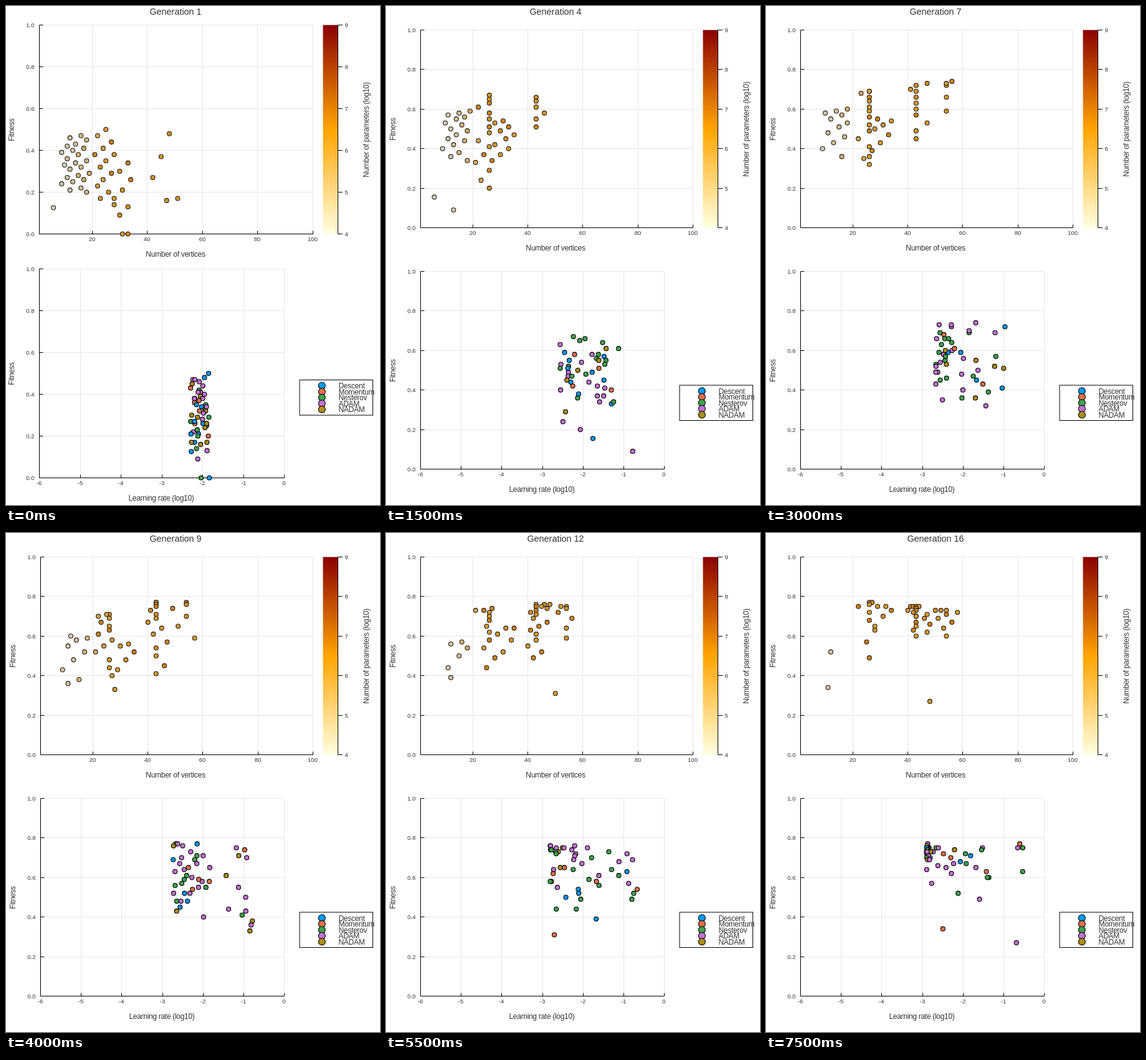
An HTML page that plays this animation: 600 by 800 pixels, repeating every 8 s.

```html
<!DOCTYPE html>
<html lang="en">
<head>
<meta charset="utf-8">
<title>Generations</title>
<style>
  html, body { margin: 0; width: 100%; height: 100%; overflow: hidden; background: #fff; }
  svg { display: block; width: 600px; height: 800px; font-family: "Liberation Sans", Arial, sans-serif; fill: #333; }
  .label { font-size: 12px; letter-spacing: -.3px; }
  .tick { font-size: 9.6px; }
  .title { font-size: 14.4px; }
  .mid { text-anchor: middle; }
  .end { text-anchor: end; }
  .grid { stroke: #e6e6e6; fill: none; }
  .axis { stroke: #000; fill: none; }
  .dot { stroke: #000; stroke-width: 1.1; }
  .soft { stroke: #222; }
</style>
</head>
<body>
<svg id="stage" viewBox="0 0 600 800"></svg>
<script>
const STEP = 500, GENERATIONS = 16;
const optimizers = [
  ['Descent', '#009afa'], ['Momentum', '#e36f47'], ['Nesterov', '#3ea44e'],
  ['ADAM', '#c371d2'], ['NADAM', '#ac8e18']
];

// Each family has a range of vertices, a favoured column and, at the key
// generations, its lowest fitness, highest fitness and size.
const keys = [1, 4, 9, 16];
const families = [
  { range: [9, 19], stages: [[.2, .47, 24], [.34, .59, 17], [.38, .6, 8], [.52, .52, 1]] },
  { range: [21, 28], column: 26, stages: [[.14, .5, 13], [.2, .67, 15], [.4, .71, 14], [.49, .77, 9]] },
  { range: [27, 35], stages: [[.09, .38, 8], [.34, .54, 10], [.43, .56, 5], [.65, .75, 5]] },
  { range: [40, 48], column: 43, stages: [[.16, .48, 4], [.51, .66, 6], [.41, .77, 15], [.6, .75, 22]] },
  { range: [49, 58], column: 54, stages: [[.17, .17, 1], [.6, .7, 0], [.59, .77, 6], [.6, .73, 9]] }
];

// Stragglers: vertices, fitness, learning rate, optimizer.
const stragglers = {
  1: [[6, .126, -2.28, 0], [31, 0, -2.04, 2], [33, 0, -1.84, 0]],
  4: [[6, .155, -1.76, 0], [13, .09, -.78, 3]],
  7: [[54, .73, -2.29, 3], [24, .35, -2.51, 3]],
  9: [[28, .33, -.85, 4], [11, .36, -.82, 3]],
  11: [[50, .31, -2.71, 1], [12, .39, -1.68, 0]],
  14: [[48, .3, -.78, 3], [12, .4, -2.17, 0]],
  16: [[48, .27, -.69, 3], [11, .34, -2.5, 1]]
};

const noise = seed => {
  const s = Math.sin(seed * 127.1 + 11.7) * 43758.5453;
  return s - Math.floor(s);
};
const clamp = v => Math.max(0, Math.min(1, v));
const mix = (a, b, t) => a + (b - a) * t;

function stageAt(stages, generation) {
  const i = Math.max(1, keys.findIndex(k => k >= generation));
  const t = (generation - keys[i - 1]) / (keys[i] - keys[i - 1]);
  return stages[i].map((v, j) => mix(stages[i - 1][j], v, t));
}

function pickOptimizer(u, age) {
  const weights = [mix(9, 4, age), mix(2, 7, age), 13, mix(14, 20, age), mix(10, 1, age)];
  let rest = u * weights.reduce((a, b) => a + b);
  return Math.min(4, weights.findIndex(w => (rest -= w) <= 0));
}

// Fit individuals gather at low learning rates; the others drift to high ones.
function learningRate(u, fitness, age) {
  const low = -2.3 - .6 * Math.sqrt(age);
  const high = -1.8 + 1.3 * age ** .35;
  const pull = 1 + 2 * Math.sqrt(age) * clamp((fitness - .4) / .35);
  return mix(low, high, age ? u ** pull : u);
}

function population(generation) {
  const age = (generation - 1) / (GENERATIONS - 1);
  const members = families.flatMap(({ range, column, stages }, family) => {
    const [low, high, size] = stageAt(stages, generation);
    const count = Math.round(size);
    return Array.from({ length: count }, (_, i) => {
      const seed = generation * 300 + family * 40 + i;
      const rank = count > 1 ? i / (count - 1) : 0;
      const fitness = Math.round(100 * mix(high, low, rank ** (1 + 1.5 * age))) / 100;
      const inColumn = column && generation > 1 && noise(seed + .3) < .4;
      const place = (i * .618 + noise(generation + family)) % 1;
      return {
        vertices: inColumn ? column : Math.round(mix(range[0], range[1], place)),
        fitness,
        rate: learningRate(noise(seed + .6), fitness, age),
        optimizer: pickOptimizer(noise(seed + .8), age)
      };
    });
  });
  const latest = Object.keys(stragglers).filter(k => k <= generation).pop();
  return members.concat(stragglers[latest].map(([vertices, fitness, rate, optimizer]) =>
    ({ vertices, fitness, rate, optimizer })));
}

function shade(vertices, fitness) {
  const jitter = noise(vertices * 3.1 + Math.round(fitness * 100)) - .5;
  const level = clamp((vertices - 9) / 16 + jitter * .3);
  const deep = level > .85 ? clamp(jitter * 1.6) : 0;
  const pale = [209, 208, 188], amber = [214, 152, 42], dark = [204, 116, 12];
  return `rgb(${pale.map((c, i) => Math.round(mix(mix(c, amber[i], level), dark[i], deep)))})`;
}

const line = (x1, y1, x2, y2, cls) => `<path class="${cls}" d="M${x1} ${y1}L${x2} ${y2}"/>`;
const text = (x, y, str, cls) => `<text x="${x}" y="${y}" class="${cls}">${str}</text>`;
const upright = (x, y, str) =>
  `<text class="label mid" transform="translate(${x} ${y}) rotate(-90)">${str}</text>`;
const dot = (x, y, fill, r = 3.55, cls = '') =>
  `<circle class="dot ${cls}" cx="${x.toFixed(2)}" cy="${y.toFixed(2)}" r="${r}" fill="${fill}"/>`;
const snap = v => Math.floor(v) + .5;

function plot({ left, right, top, bottom, ticks, x, y, caption, captionX, captionY }) {
  const xs = ticks.map(v => [v, snap(x(v))]);
  const ys = [0, .2, .4, .6, .8, 1].map(v => [v, snap(y(v))]);
  return xs.map(([, px]) => line(px, top, px, bottom, 'grid')).join('') +
    ys.map(([, py]) => line(left, py, right, py, 'grid')).join('') +
    line(left, top, left, bottom, 'axis') + line(left, bottom, right, bottom, 'axis') +
    xs.map(([v, px]) => line(px, bottom, px, bottom - 5, 'axis') +
      text(px - .5, bottom + 11.7, v, 'tick mid')).join('') +
    ys.map(([v, py]) => line(left, py, left + 6, py, 'axis') +
      text(left - 8, py + 3.3, v.toFixed(1), 'tick end')).join('') +
    text(captionX, captionY, caption, 'label mid') +
    upright(left - 40.5, (top + bottom) / 2 + .5, 'Fitness');
}

function colorbar(top, bottom) {
  const ticks = [4, 5, 6, 7, 8, 9].map(v => {
    const y = snap(mix(bottom, top, (v - 4) / 5));
    return line(532.5, y, 540, y, 'axis') + text(543.5, y + 3.3, v, 'tick');
  });
  return `<defs><linearGradient id="heat" x2="0" y2="1"><stop stop-color="#8b0000"/>` +
    `<stop offset=".5" stop-color="#ffa500"/><stop offset="1" stop-color="#ffffe0"/></linearGradient></defs>` +
    `<rect x="508.5" y="${top}" width="24" height="${bottom - top}" fill="url(#heat)"/>` +
    line(532.5, top, 532.5, bottom, 'axis') + ticks.join('') +
    upright(582, (top + bottom) / 2 + .5, 'Number of parameters (log10)');
}

function legend(y) {
  return `<rect x="471" y="${y}" width="117.5" height="56.5" fill="#fff" stroke="#000"/>` +
    optimizers.map(([name, color], i) => {
      const cy = y + 9.3 + i * 9.5;
      return dot(506.8, cy, color, 5.5) + text(533.5, cy + 4.2, name, 'label');
    }).join('');
}

function draw(generation) {
  const first = generation === 1;
  const left = first ? 53.5 : 55.5;
  const upper = first ? [30.5, 365.5] : [38.5, 355.5];
  const lower = first ? [421.5, 756.5] : [425.5, 742.5];
  const unit = first ? 4.43 : 4.415;
  const vx = v => 492.5 + (v - 100) * unit;
  const rx = v => 446.7 + v * (446.7 - left) / 6;
  const uy = v => mix(upper[1], upper[0], v);
  const ly = v => mix(lower[1], lower[0], v);
  const members = population(generation);

  return text(272, 14, `Generation ${generation}`, 'title mid') +
    plot({ left, right: 492.5, top: upper[0], bottom: upper[1], x: vx, y: uy,
      ticks: [20, 40, 60, 80, 100], caption: 'Number of vertices',
      captionX: 272, captionY: first ? 402 : 392 }) +
    colorbar(...upper) +
    members.map(m => dot(vx(m.vertices), uy(m.fitness), shade(m.vertices, m.fitness), 3.5, 'soft')).join('') +
    plot({ left, right: 446.5, top: lower[0], bottom: lower[1], x: rx, y: ly,
      ticks: [-6, -5, -4, -3, -2, -1, 0], caption: 'Learning rate (log10)',
      captionX: first ? 249 : 250, captionY: first ? 793 : 779 }) +
    members.map(m => dot(rx(m.rate), ly(m.fitness), optimizers[m.optimizer][1])).join('') +
    legend(first ? 599.5 : 608);
}

const stage = document.getElementById('stage');
let shown = 0;
function update() {
  const generation = Math.floor(performance.now() / STEP) % GENERATIONS + 1;
  if (generation !== shown) {
    stage.innerHTML = draw(generation);
    shown = generation;
  }
  requestAnimationFrame(update);
}
update();
</script>
</body>
</html>
```
